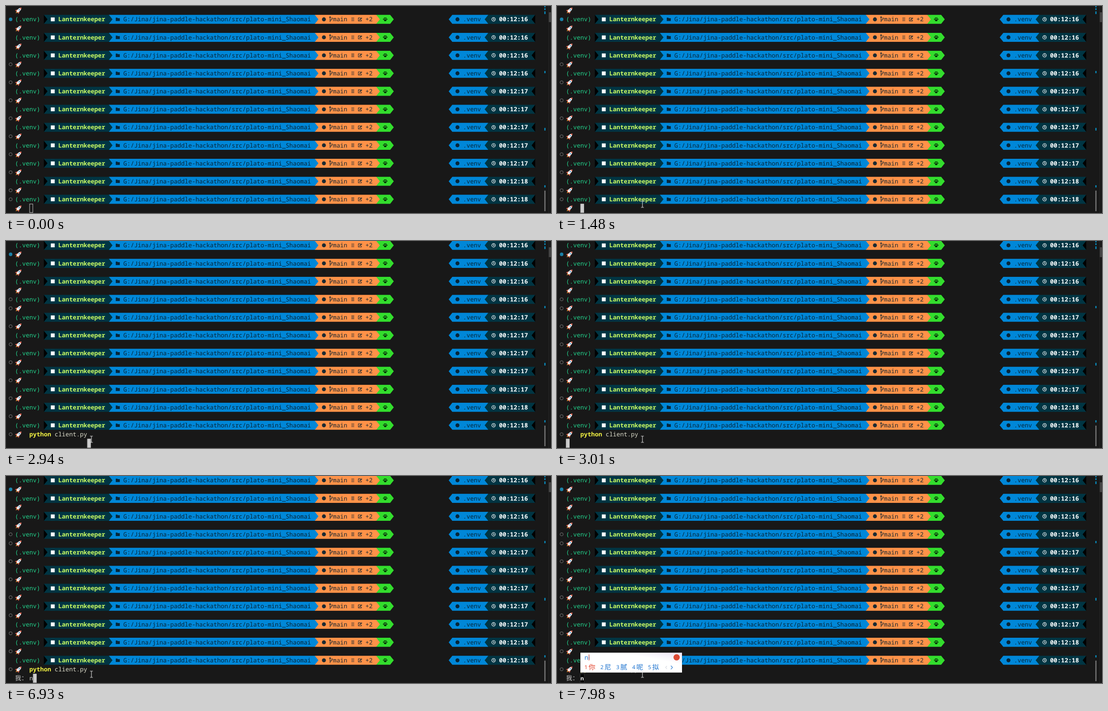
Recreate the animation shown at these times as an HTML page. Size 1212x462 px, loop 8000 ms.

```html
<!DOCTYPE html>
<html lang="en">
<head>
<meta charset="utf-8">
<title>Terminal session</title>
<style>
  html, body { margin: 0; width: 100%; height: 100%; overflow: hidden; background: #181818; }
  svg { display: block; width: 1212px; height: 462px; }
  text { font: 13.39px "Noto Sans Mono", "DejaVu Sans Mono", monospace; white-space: pre; text-rendering: geometricPrecision; }
  .bold { font-weight: 600; }
  .cjk { font-family: "Noto Sans CJK SC", "Noto Sans CJK", sans-serif; font-size: 14px; }
  .popup text { font-family: "Noto Sans", "Noto Sans CJK SC", "Noto Sans CJK", sans-serif; font-size: 12px; }
  .popup .word { font-family: "Noto Sans CJK SC", "Noto Sans CJK", sans-serif; font-size: 15px; }

  .anim { animation: 8s step-end -2ms infinite; }
  .scroll { animation-name: scroll; }
  .command { animation-name: command; }
  .me { animation-name: me; }
  .key-n { animation-name: key-n; }
  .key-i { animation-name: key-i; }
  .popup { animation-name: popup; }
  .cursor { animation-name: cursor; }
  .pointer { animation-name: pointer; }

  @keyframes scroll { 0% { transform: none } 36.75%, 100% { transform: translateY(-20.08px) } }
  @keyframes command { 0% { opacity: 0 } 28.5%, 100% { opacity: 1 } }
  @keyframes me { 0% { opacity: 0 } 53.25%, 100% { opacity: 1 } }
  @keyframes key-n { 0% { opacity: 0 } 86.625% { opacity: 1 } 94.75%, 100% { opacity: 0 } }
  @keyframes key-i { 0% { opacity: 0 } 87.25% { opacity: 1 } 93.875%, 100% { opacity: 0 } }
  @keyframes popup { 0% { opacity: 0 } 99.75%, 100% { opacity: 1 } }
  @keyframes cursor {
    0% { fill: transparent; transform: translateX(32.14px) }
    18.5% { fill: #ccc; transform: translateX(32.14px) }
    28.5% { fill: #ccc; transform: translateX(160.7px) }
    37.625% { fill: #ccc; transform: none }
    53.25% { fill: #ccc; transform: translateX(32.14px) }
    86.625%, 93.875% { fill: #ccc; transform: translateX(40.18px) }
    87.25% { fill: #ccc; transform: translateX(48.21px) }
    94.75%, 100% { fill: #ccc; transform: translateX(32.14px) }
  }
  @keyframes pointer {
    0% { opacity: 0; transform: translate(1088px, 439px) }
    2.5% { opacity: 1; transform: translate(1088px, 439px) }
    3.4% { opacity: 1; transform: translate(985px, 441px) }
    4.2% { opacity: 1; transform: translate(850px, 444px) }
    5% { opacity: 1; transform: translate(715px, 448px) }
    5.8% { opacity: 1; transform: translate(599px, 451px) }
    6.625% { opacity: 0; transform: translate(599px, 451px) }
    13.625% { opacity: 1; transform: translate(182px, 463px) }
    14.25% { opacity: 1; transform: translate(185px, 457px) }
    15.4% { opacity: 1; transform: translate(190px, 449px) }
    16.4% { opacity: 1; transform: translate(194px, 440px) }
    17.5% { opacity: 1; transform: translate(192px, 441px) }
    18.5%, 100% { opacity: 1; transform: translate(190px, 442.5px) }
  }
</style>
</head>
<body>
<svg id="stage" viewBox="0 0 1212 462">
  <defs>
    <linearGradient id="sheen" x1="0" x2="1" y1="1" y2="0">
      <stop offset=".7" stop-color="#fff"/><stop offset="1" stop-color="#ece4f6"/>
    </linearGradient>
    <g id="rocket" transform="rotate(45)">
      <path d="M-1.8 4.5L0 9.4L1.8 4.5z" fill="#f7922d"/>
      <path d="M-2.6 0L-5 3.4V6.4L-1.6 4.6H1.6L5 6.4V3.4L2.6 0z" fill="#d8583f"/>
      <path d="M0-8.6C3.6-5 3.6 1 2 5H-2C-3.6 1-3.6-5 0-8.6z" fill="#eef0f3"/>
      <path d="M0-8.6Q1.7-7 2.3-5.2H-2.3Q-1.7-7 0-8.6z" fill="#e0553f"/>
      <circle cy="-1.8" r="1.4" fill="#3d84b8"/>
    </g>
    <g id="folder"><path d="M-4.5-3.8H-1L0-2.6H4.5V3.8H-4.5z"/></g>
    <g id="branch" fill="none" stroke="#1c2b33" stroke-width="1.3">
      <path d="M-2.3-6V6M-2.3 2.4Q2.2 1.6 2.2-2.5M-4-3.8L-2.3-6L-.6-3.8M.6-2.8H3.6"/>
    </g>
    <g id="edit" fill="none" stroke="#1c2b33" stroke-width="1.1">
      <path d="M1.5-3.3H-4V3.6H3V1"/><path d="M-1.4 1.4L4-3.4" stroke-width="1.9"/>
    </g>
    <g id="paw" fill="#08300a">
      <ellipse cy="2" rx="2.8" ry="2.2"/>
      <circle cx="-3.7" cy="-.3" r="1.3"/><circle cx="-1.5" cy="-2.7" r="1.4"/>
      <circle cx="1.5" cy="-2.7" r="1.4"/><circle cx="3.7" cy="-.3" r="1.3"/>
    </g>
    <g id="clock" fill="none" stroke="#fff" stroke-width="1.2">
      <circle r="3.9"/><path d="M-.2-2.4V.4H2"/>
    </g>
  </defs>
</svg>
<script>
{
  const CELL = 8.035, ROW = 20.08;
  const INK = '#06263a', TEAL = '#003543', BLUE = '#0087d8';
  const col = c => 19.9 + CELL * c;
  const rowTop = r => -0.35 + ROW * r;
  const mid = r => rowTop(r) + ROW / 2;

  const text = (c, r, fill, str, cls = '') =>
    `<text x="${col(c)}" y="${mid(r) + 4.7}" fill="${fill}" class="${cls}">${str}</text>`;
  const icon = (id, x, r) => `<use href="#${id}" x="${x}" y="${mid(r)}"/>`;
  const dot = (x, y, radius, fill) => `<circle cx="${x}" cy="${y}" r="${radius}" fill="${fill}"/>`;
  const ring = r => `<circle cx="10.3" cy="${mid(r)}" r="3.4" fill="none" stroke="#5c5c5c" stroke-width="1.5"/>`;
  const rect = (x, y, w, h, fill) => `<rect x="${x}" y="${y}" width="${w}" height="${h}" fill="${fill}"/>`;

  // Powerline segment: flat edge at one column, arrow tip at the other.
  const arrow = (flat, tip, r, fill) => {
    const neck = col(tip + Math.sign(flat - tip)), y = rowTop(r), end = y + ROW;
    return `<polygon fill="${fill}" points="${col(flat)},${y} ${neck},${y} ${col(tip)},${mid(r)} ${neck},${end} ${col(flat)},${end}"/>`;
  };

  const promptLine = (r, seconds) => {
    const y = mid(r);
    return [
      arrow(100, 104.85, r, '#33dd2d'), arrow(83, 101, r, '#ff9248'),
      arrow(26, 84, r, BLUE), arrow(8, 27, r, TEAL), arrow(8, 9, r, '#000'),
      arrow(131, 120.05, r, BLUE), arrow(144, 130, r, TEAL), arrow(144, 143, r, '#000'),
      text(0, r, '#23d18b', '(.venv)'),
      rect(99.7, y - 4.2, 8.6, 8.6, '#fff'),
      text(12, r, '#cdff63', 'Lanternkeeper', 'bold'),
      `<g fill="${INK}">${icon('folder', 248.6, r)}</g>`,
      text(30, r, INK, 'G:/Jina/jina-paddle-hackathon/src/plato-mini_Shaomai'),
      dot(707, y, 4.4, '#1c2b33'), icon('branch', 723, r),
      text(88, r, '#1c2b33', 'main'),
      `<path d="M768 ${y - 3}h6.4m-6.4 3h6.4m-6.4 3h6.4" stroke="#1c2b33" stroke-width="1.1"/>`,
      icon('edit', 787.5, r), text(97, r, '#1c2b33', '+2'), icon('paw', 843.3, r),
      dot(1004, y, 4.4, INK), text(124, r, INK, '.venv'),
      icon('clock', 1084.3, r), text(134, r, '#fff', '00:12:' + seconds, 'bold')
    ].join('');
  };

  let lines = '';
  for (let r = 0; r <= 22; r++) {
    const seconds = r < 9 ? 16 : r < 19 ? 17 : 18;
    lines += r % 2 ? promptLine(r, seconds) : icon('rocket', 28.2, r);
    if (r >= 8 && r % 2 === 0 && r < 22) lines += ring(r);
  }
  lines += `<g class="anim command">${text(4, 22, '#f5f543', 'python', 'bold')}${text(11, 22, '#dcdccb', 'client.py')}</g>`;

  const rulers = [[0, 3], [5, 4], [12, 6], [145, 5], [272, 6], [400, 5]]
    .map(([y, h]) => rect(1197, y, 3, h, '#0b7ba6')).join('')
    + rect(1197, 412, 3, 46, '#676767') + rect(1206.5, 0, 1, 462, '#292929') + rect(1207, 14, 5, 22, '#434343');

  const candidates = [...'你尼腻呢拟'].map((word, i) => {
    const x = 61 + 35.4 * i, fill = i ? '#1f74cf' : '#e2432c';
    return `<text x="${x}" y="430.5" fill="${fill}">${i + 1}</text><text class="word" x="${x + 9.2}" y="431.5" fill="${fill}">${word}</text>`;
  }).join('');

  const popup = `<g class="anim popup">
    ${rect(col(4), rowTop(22), CELL, ROW, '#000')}${text(4, 22, '#fff', 'n', 'bold')}
    <rect x="51.5" y="393.8" width="227" height="45.5" rx="1" fill="#000" opacity=".35"/>
    ${rect(52, 394.3, 226, 44.4, 'url(#sheen)')}
    <text x="61" y="409.5" fill="#1f74cf" style="font-size:14px">ni</text>
    ${rect(70.6, 398, 1, 14, '#e2432c')}${dot(266, 404.8, 7, '#dc4a35')}
    ${candidates}
    <g fill="none" stroke-width="1.2"><path d="M244.5 424l-3 3.3 3 3.3" stroke="#d5d9e0"/>
    <path d="M253.3 423.3l3.5 4-3.5 4" stroke="#1f74cf"/></g></g>`;

  document.getElementById('stage').insertAdjacentHTML('beforeend', `
    <g class="anim scroll">${lines}</g>
    ${dot(10.3, mid(1), 3.9, '#1b81a8')}${ring(6)}${ring(21)}${rulers}
    <rect class="anim cursor" x="${col(0) + .4}" y="${rowTop(22) + .5}" width="7.2" height="19" stroke="#ccc"/>
    <g class="anim me">${text(0, 22, '#ccc', '我：', 'cjk')}</g>
    <g class="anim key-n">${text(4, 22, '#ccc', 'n')}</g>
    <g class="anim key-i">${text(5, 22, '#ccc', 'i')}</g>
    ${popup}
    <path class="anim pointer" d="M-3.2-7H-1L0-6.2L1-7H3.2M0-6.2V6.2M-3.2 7H-1L0 6.2L1 7H3.2" fill="none" stroke="#e8e8e8" stroke-width="1.1"/>`);
}
</script>
</body>
</html>
```
